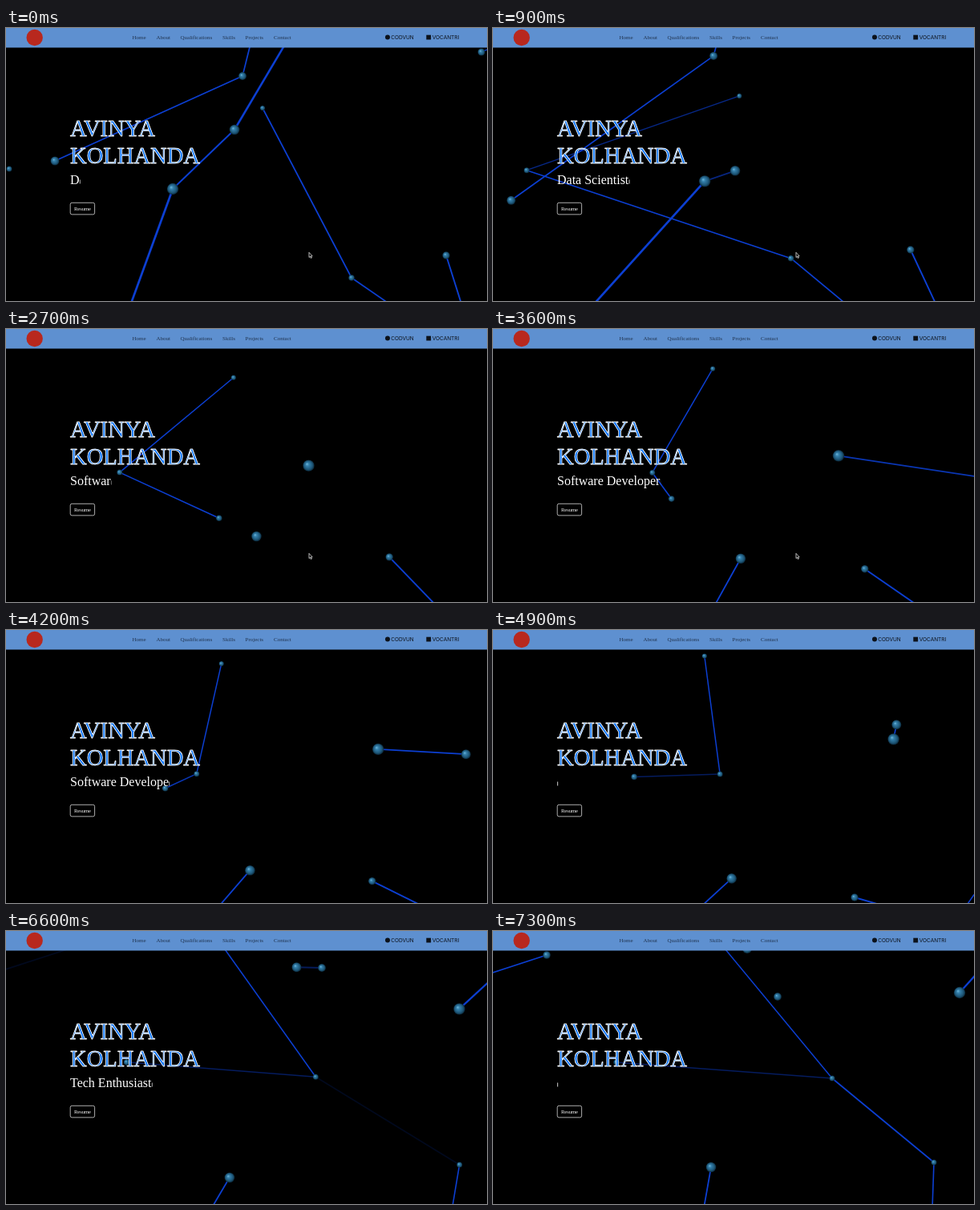
An HTML page with a canvas for the animation above (7.4 s loop, 600 by 341 pixels).

```html
<!DOCTYPE html>
<html lang="en">
<head>
<meta charset="utf-8">
<title>Portfolio</title>
<style>
  html, body { margin: 0; height: 100%; overflow: hidden; background: #000; }
  canvas { display: block; width: 100vw; height: 100vh; }
</style>
</head>
<body>
<canvas id="stage"></canvas>
<script>
const W = 600, H = 341, LOOP = 7400, STEP = 100, END = 7300, FADE = 700;
const SERIF = '"Liberation Serif", serif';
const canvas = document.getElementById('stage');
const ctx = canvas.getContext('2d');
const ratio = window.devicePixelRatio || 1;
canvas.width = W * ratio;
canvas.height = H * ratio;
ctx.scale(ratio, ratio);

const clamp = (value, low, high) => Math.max(low, Math.min(high, value));

// Polynomial through values evenly spaced over u = 0..1, continuing beyond both ends.
function curve(values, u) {
  const s = u * (values.length - 1);
  return values.reduce((sum, value, i) =>
    sum + values.reduce((part, _, j) => j === i ? part : part * (s - j) / (i - j), value), 0);
}

// A ball gliding on a smooth path between two times.
const ball = (radius, from, to, ...points) => ({
  radius,
  at: t => [0, 1].map(axis => curve(points.map(point => point[axis]), (t - from) / (to - from))),
});

const left = ball(5.5, 0, 1900, [61, 166], [-20, 270]);
const top_ = ball(5, 0, 1900, [295, 60], [253, 7]);
const corner = ball(4.6, 0, 900, [593, 30], [575, 5]);
const high = ball(3.1, 0, END, [320, 100], [287, 64], [264, 33], [261, -12]);
const east = ball(3.5, 0, END, [4, 176], [125.5, 179], [281, 180], [423, 184]);
const west = ball(3.8, 0, END, [431, 312], [280, 243.7], [177, 184], [154, 164]);
const near = ball(7.2, 0, END, [208, 201], [361, 174], [498, 137], [582, 77]);
const fall = ball(6.3, 0, END, [285, 127], [312.5, 249], [298, 310], [272, 295]);
const low = ball(4.7, 0, 4900, [549, 284], [483, 282], [451, 334]);
const drift = ball(6, 3600, END, [640, 190], [453, 92], [317, 22]);
const late = ball(3.5, 4900, END, [625, 295], [580, 293.5], [550, 289]);
const visitor = ball(4.9, 5900, END, [433, 10], [355, 82]);
const entry = ball(4.8, 5900, END, [110, 8], [67, 30]);
const balls = [left, top_, corner, high, east, west, near, fall, low, drift, late, visitor, entry];

// A line end far off the stage, seen from a ball at a turning angle in degrees.
const beyond = (origin, from, to, ...angles) => ({
  at(t) {
    const [x, y] = origin.at(t);
    const angle = curve(angles, (clamp(t, from, to) - from) / (to - from)) * Math.PI / 180;
    return [x + W * Math.cos(angle), y + W * Math.sin(angle)];
  },
});

const link = (a, b, width, start = -FADE, stop = LOOP + FADE, tone = 1) => ({ a, b, width, start, stop, tone });
const ray = (a, width, start, stop, ...angles) =>
  link(a, beyond(a, Math.max(0, start + FADE), Math.min(END, stop - FADE), ...angles), width, start, stop);

const links = [
  link(left, top_, 1.7, -FADE, 1700),
  link(high, west, 1.7, -FADE, 800),
  link(high, east, 1.5, 450),
  link(east, west, 1.6, 200, 4800),
  link(east, west, 1.5, 4100, LOOP + FADE, .45),
  link(near, fall, 2, -FADE, 800),
  link(near, fall, 1.8, 0, 2700, .6),
  link(near, drift, 1.7, 3000, 5600),
  link(drift, visitor, 2, 5200, 6900),
  link(late, east, 1.7, 6500),
  ray(top_, 1.7, -FADE, 1600, -76, -75),
  ray(corner, 1.5, -FADE, 900, -23),
  ray(west, 1.7, -FADE, 1600, 34.6, 39.7),
  ray(near, 2.7, -FADE, 1600, 110, 132),
  ray(near, 2.2, 5200, LOOP + FADE, -37.5, -48),
  ray(fall, 2.5, -FADE, 700, -59.4),
  ray(fall, 1.8, 2900, LOOP + FADE, 119, 137, 100),
  ray(left, 2, 1200, 2600, 17.2),
  ray(low, 1.9, -FADE, 5600, 72.5, 49, 16),
  ray(late, 1.6, 4200, LOOP + FADE, 125, 106, 92),
  ray(entry, 1.7, 6500, LOOP + FADE, 162),
];

const phrases = [
  { text: 'Data Scientist', start: -65 },
  { text: 'Software Developer', start: 2195 },
  { text: 'Tech Enthusiast', start: 4930 },
];
const TYPE = 65, ERASE = 40, PAUSE = 790;

function typedAt(t) {
  const { text, start } = phrases.findLast(phrase => phrase.start <= t);
  const full = text.length * TYPE, age = t - start;
  const erased = Math.max(0, Math.floor((age - full - PAUSE) / ERASE));
  return text.slice(0, Math.max(0, Math.min(text.length, Math.floor(age / TYPE)) - erased));
}

function label(text, x, y, font, color) {
  ctx.font = font;
  ctx.fillStyle = color;
  ctx.fillText(text, x, y);
}

function disc(x, y, radius, fill) {
  ctx.fillStyle = fill;
  ctx.beginPath();
  ctx.arc(x, y, radius, 0, 7);
  ctx.fill();
}

function sphere(x, y, radius) {
  const shade = ctx.createRadialGradient(x - radius * .3, y - radius * .3, 0, x, y, radius);
  shade.addColorStop(0, '#6fb9dc');
  shade.addColorStop(.3, '#347fab');
  shade.addColorStop(.75, '#1d5677');
  shade.addColorStop(1, '#0a2637');
  disc(x, y, radius, shade);
}

function drawNetwork(t) {
  ctx.strokeStyle = '#0c3fd2';
  for (const { a, b, width, start, stop, tone } of links) {
    ctx.globalAlpha = tone * clamp(Math.min(t - start, stop - t) / FADE, 0, 1);
    ctx.lineWidth = width;
    ctx.beginPath();
    ctx.moveTo(...a.at(t));
    ctx.lineTo(...b.at(t));
    ctx.stroke();
  }
  ctx.globalAlpha = 1;
  for (const { at, radius } of balls) sphere(...at(t), radius);
}

function drawHero(t) {
  ctx.strokeStyle = '#fff';
  ctx.lineWidth = .85;
  ctx.lineJoin = 'round';
  ['AVINYA', 'KOLHANDA'].forEach((word, row) => {
    const y = 135 + row * 34.3;
    label(word, 80, y, `28.6px ${SERIF}`, '#0a74ff');
    ctx.strokeText(word, 80, y);
  });

  const typed = typedAt(t);
  label(typed, 80, 194.5, `16px ${SERIF}`, '#fff');
  const caret = 80 + ctx.measureText(typed).width;
  ctx.globalAlpha = .5 + .5 * Math.cos((t - 4900) / 800 * 2 * Math.PI);
  ctx.fillRect(caret + .3, 189.5, .8, 5);
  ctx.globalAlpha = 1;

  ctx.strokeStyle = '#d8d8d8';
  ctx.lineWidth = .8;
  ctx.beginPath();
  ctx.roundRect(80.2, 218.3, 30.4, 14.6, 2);
  ctx.stroke();
  label('Resume', 85, 228, `6.5px ${SERIF}`, '#fff');
}

function drawNavbar() {
  ctx.fillStyle = '#5e90d0';
  ctx.fillRect(0, 0, W, 24.5);
  disc(35.7, 12, 10.2, '#b8281e');
  const items = { Home: 157.5, About: 187.5, Qualifications: 217.5, Skills: 270, Projects: 298.5, Contact: 334 };
  for (const name in items) label(name, items[name], 14.3, `7px ${SERIF}`, '#21344f');
  disc(476, 11.5, 3, '#0c121b');
  ctx.fillRect(524.3, 8.7, 5.8, 5.8);
  label('CODVUN', 480.3, 14, '6.5px Inter, sans-serif', '#0c121b');
  label('VOCANTRI', 531.8, 14, '6.5px Inter, sans-serif', '#0c121b');
}

function drawPointer() {
  ctx.strokeStyle = '#fff';
  ctx.lineWidth = .7;
  ctx.stroke(new Path2D('M378 280.3v6.2l1.4-1.2 1 2.2 1-.5-1-2.1h1.8z'));
}

function draw(now) {
  const t = Math.floor(now % LOOP / STEP) * STEP;
  ctx.fillStyle = '#000';
  ctx.fillRect(0, 0, W, H);
  drawNetwork(t);
  drawHero(t);
  drawNavbar();
  if (t < 4100) drawPointer();
  requestAnimationFrame(draw);
}

draw(0);
</script>
</body>
</html>
```
